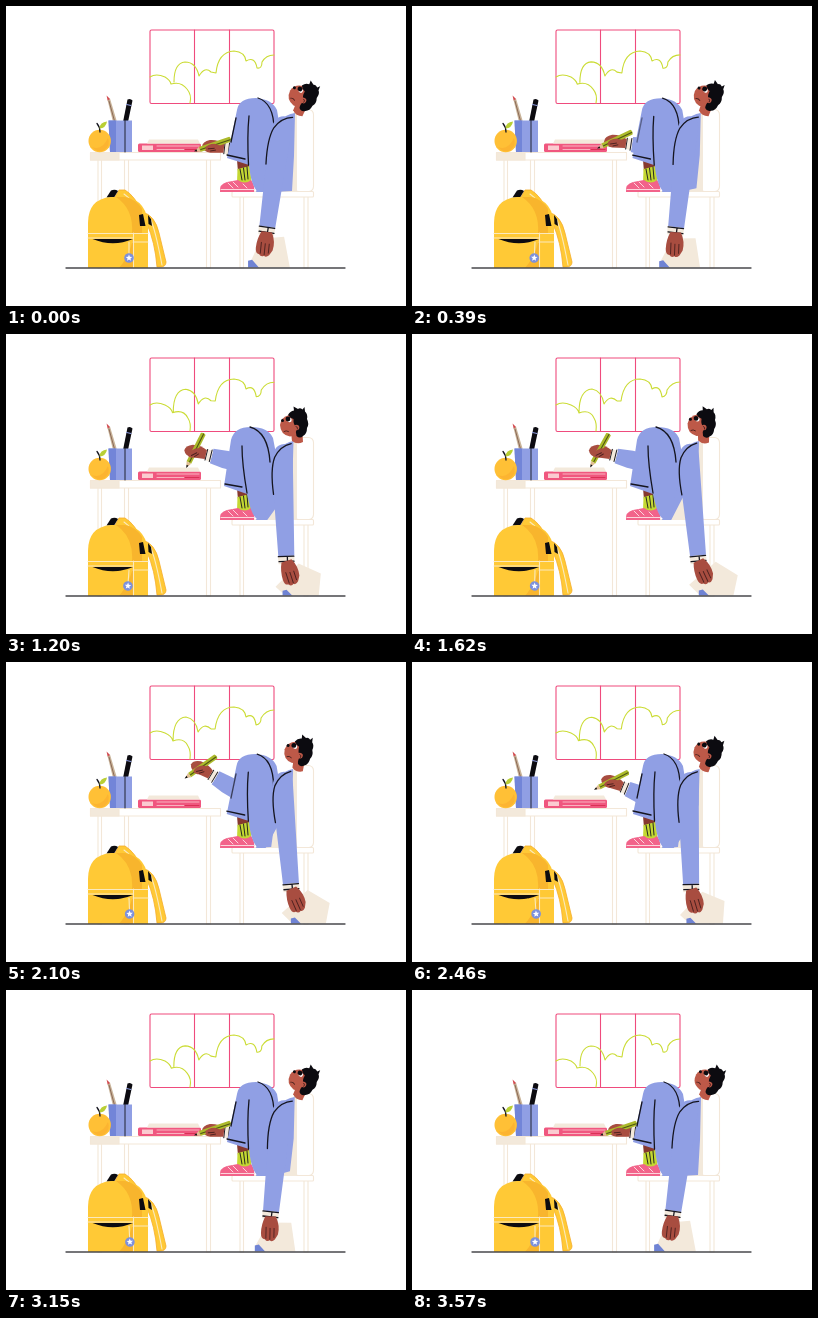
An HTML page that plays this animation: 400x300 px, repeating every 3.6 s.

```html
<!DOCTYPE html>
<html lang="en">
<head>
<meta charset="utf-8">
<title>Daydreaming at the desk</title>
<style>
html, body { margin: 0; width: 100%; height: 100%; overflow: hidden; background: #fff; }
svg { display: block; width: 100vw; height: 100vh; }
path, rect, circle, polygon { stroke-linejoin: round; stroke-linecap: round; }
.ink { fill: none; stroke: #15151f; stroke-width: 1.3; }
.thin { fill: none; stroke: #15151f; stroke-width: .9; }
.cream { fill: #f3e9db; }
.frame { fill: #fff; stroke: #f3e7d8; stroke-width: 1.1; }
.pale { fill: none; stroke: #fbe9bd; stroke-width: 1.1; }
.blue { fill: #909fe4; }
.skin { fill: #bd5948; }
.palm { fill: #a84d40; }
.crease { fill: none; stroke: #4c211f; stroke-width: .9; }
.black { fill: #0c0b10; }
.yellow { fill: #ffc936; }
</style>
</head>
<body>
<svg viewBox="0 0 400 300">
  <defs><clipPath id="above"><rect width="400" height="261.6"/></clipPath></defs>

  <g fill="none" stroke="#ef4b7d" stroke-width="1.1">
    <rect x="144" y="24" width="124" height="73.5" rx="1.5"/>
    <path d="M188.5 24V97.5M223.5 24V97.5"/>
  </g>
  <path id="clouds" fill="none" stroke="#cbdc35" stroke-width="1.1"/>

  <g class="frame">
    <path d="M92 154V262H95.5V154M118.5 154V262H122.5V154M200.5 154V262H204.5V154"/>
    <rect x="84.5" y="146.5" width="130" height="7.5"/>
    <path class="cream" d="M84.5 146.5H113V154H84.5Z"/>
    <path d="M234 191V262H237.5V191M298 191V262H302V191"/>
    <rect x="226" y="185.5" width="81.5" height="5.5" rx="1"/>
    <rect x="288" y="103.5" width="19.5" height="82" rx="5"/>
  </g>
  <path class="cream" d="M287 108H291V185H287Z"/>

  <g id="cup">
    <g id="pens">
      <path d="M101.5 94L104 92.5L111 116H107Z" fill="#c9b49a"/>
      <path d="M100.6 89.5L104 93L101.6 94.5Z" fill="#d2474c"/>
      <path d="M103 95L108.5 115" stroke="#7b5645" stroke-width=".8"/>
      <path class="black" d="M121.5 93.5Q124.5 92 126.5 94.5L122 116H117Z"/>
      <path d="M120.5 98.5L125 99.5" stroke="#909fe4"/>
    </g>
    <path class="blue" d="M102.5 114.5H126V146H104Z"/>
    <path d="M102.5 114.5H110V146H104Z" fill="#7285d8"/>
    <path class="thin" d="M119 114.5V146"/>
  </g>

  <g id="fruit">
    <circle cx="93.7" cy="135" r="11.2" fill="#ffc036"/>
    <path d="M86 141Q96 145 102 132Q105 139 98 144.5Q91 147 86 141Z" fill="#fcb431"/>
    <path class="ink" d="M94 126Q94 121 91 117.5"/>
    <path d="M93.5 122.5Q94 116 101 115.5Q100 122 93.5 122.5Z" fill="#b9cf35"/>
  </g>

  <g id="book">
    <rect x="132" y="137.5" width="63" height="8.5" rx="1.5" fill="#f0577f"/>
    <rect x="136" y="139.5" width="11" height="4.5" fill="#fbcbd0"/>
    <path d="M151 140H193M151 143.5H178" stroke="#fbcbd0" stroke-width=".8"/>
    <path d="M179 143.5H193" stroke="#d93255"/>
  </g>
  <path id="sheet" class="cream" d="M143 133.5H192L194 137.5H141Z"/>

  <g id="bag">
    <path class="yellow" d="M109 191L113 184H119Q129 190 136 206Q149 209 153 227L160 256Q160 261 154 261H151Q149 236 141 218Z" stroke="#f5ad2a" stroke-width=".8"/>
    <path class="pale" d="M118 188Q128 195 134 208M144 212Q149 222 156 259"/>
    <path class="black" d="M100.5 191.5L105 184.5Q109 183 112 185L108 191.5Z"/>
    <path class="yellow" d="M82 262V217Q82 193 105 191H119Q142 194 142 222V262Z"/>
    <path d="M110 191H119Q130 193 136 203V228H126Q128 203 110 191ZM127 234V262H113Q122 252 127 234Z" fill="#f8b52d"/>
    <path class="pale" d="M82 227.5H142M127.5 227V262M82 232H127M127 236H142"/>
    <path class="black" d="M86.5 233H127Q107 241.5 86.5 233ZM133 209L137 208L139.5 220H134ZM142 209L145 213L146 220L142.5 218Z"/>
    <g id="charm">
      <path class="pale" d="M123 236V248"/>
      <circle cx="123" cy="252" r="4.8" fill="#7d91dc"/>
      <polygon id="star" fill="#fff"/>
    </g>
  </g>

  <g id="forearm">
    <path class="blue" d="M17 -7.5L32 -9H62V9H30L17 7.5Z"/>
    <path class="cream" d="M10 -5.5H17V5.5H10Z"/>
    <path class="thin" d="M11.5 -5.5V5.5M16 -6V6"/>
    <path class="palm" d="M11 -4.5Q4 -8 -4 -6.5Q-11 -4 -11 1Q-9 6 -2 6L11 4.5Z"/>
  </g>
  <g id="pencil">
    <path d="M-14 -2.6H18Q20 0 18 2.6H-14Z" fill="#acba2b"/>
    <path d="M-13 .4H18" stroke="#4d5514" stroke-width="1.1"/>
    <path d="M-14 -2.6L-19.5 0L-14 2.6Z" fill="#e0bd92"/>
    <path class="black" d="M-17 -1.1L-20 0L-17 1.1Z"/>
  </g>
  <g id="fingers">
    <path class="palm" d="M-8 0Q-5 -4 2 -3L8 0Q5 5 -1 5Q-7 4 -8 0Z"/>
    <path class="crease" d="M-5 1L1 1.5M-3 3.5L2 3.5"/>
  </g>

  <path class="cream" d="M264 125L290 106V186H255Z"/>
  <path id="torso" class="blue"/>

  <g id="head">
    <path class="skin" d="M285 98L296 93L297 108Q291 111 286 107Z"/>
    <path class="skin" d="M283 81Q275 83 274 91Q274.5 101 284 102.5Q292 102 295 95L294 80Z"/>
    <path class="black" d="M282 81Q284 77 288 76.5L287.5 72.5L292 75Q294 73.5 296.5 75.5L298.5 73L299 77.5Q302 80 301 85Q303.5 90 301 94Q301 100 297 102Q294 105 290.5 102Q289 98 291 94Q287 91 287.5 85Q284 84 282 81Z"/>
    <circle class="skin" cx="290.5" cy="93.5" r="2.8"/>
    <circle cx="283.5" cy="86" r="2.2" fill="#fff"/>
    <circle class="black" cx="282" cy="85" r="2.4"/>
    <circle class="black" cx="276.5" cy="86.5" r="1.5"/>
    <path class="crease" d="M278 97.5Q280 96 282.5 97.5M290 92.5Q292 92.5 291.5 95"/>
  </g>

  <path d="M231 154H243V166H232Z" fill="#86382f"/>
  <path d="M231.5 163L244 160L245.5 177H231Z" fill="#c4d832"/>
  <path class="thin" d="M234 163L236 174M237.5 162L239 174M241 161L242 173"/>
  <path d="M214 186Q213 178 221 176L232 174Q239 179 245 174Q249 179 248 186Z" fill="#f2638a"/>
  <path d="M215 183.5H248M222 177L227 182M227 176L232 181M237 178L241 182" fill="none" stroke="#fcd5dc" stroke-width="1"/>
  <path id="leg" class="blue"/>
  <path id="folds" class="ink"/>
  <path id="edge" class="ink" d="M230 112L225 136"/>

  <g clip-path="url(#above)">
    <polygon id="folder" class="cream"/>
    <polygon id="cover" fill="#6f83d4"/>
  </g>
  <g id="arm">
    <path class="blue" d="M-11.5 12Q-10 -8 2 -8Q11 -7 10 9L8 104H-8Z"/>
    <path class="ink" d="M-10.5 42Q-13 17 -8 5Q-2 -6 9 -8"/>
    <path class="cream" d="M-8.5 104H8V112H-8Z"/>
    <path class="ink" d="M-8 104.5H7.5M-7.5 109.5H7.5M1 105V109"/>
  </g>
  <g id="hand">
    <path class="palm" d="M-5 -1H5.5Q10 8 8 17L5 22Q2 25 0 23Q-3 25 -5 22Q-9 22 -9 16Q-9 7 -5 -1Z"/>
    <path class="crease" d="M-4 10V21M0 11V22M4 11V20"/>
  </g>

  <path d="M60 262H339" stroke="#48484c" stroke-width="1.3"/>
</svg>
<script>
const LOOP = 3600, STEP = 30;
const $ = id => document.getElementById(id);
const set = (id, name, value) => $(id).setAttribute(name, value);
const place = (id, x, y, turn = 0) =>
  set(id, 'transform', `translate(${x} ${y}) rotate(${turn})`);
const mix = (a, b, k) => a + (b - a) * k;

// Each row: time, then the values reached at that time
const headPath = [[0, 28], [250, 28], [720, 14], [1120, 0], [1300, 0], [1620, 5], [2100, 14], [2640, 28], [LOOP, 28]];
const kneePath = [[0, 0], [250, 0], [720, .85], [1120, 1], [1650, 1], [2100, .1], [2500, 0], [LOOP, 0]];
// hand x, hand y, pencil angle, elbow x, elbow y
const rest = [207, 141, -18.4, 250, 146];
const handPath = [
  [0, ...rest], [250, ...rest],
  [720, 189, 117, -51, 250, 133],
  [1000, 188, 118, -64, 250, 133],
  [1660, 188, 118, -61, 250, 133],
  [2100, 195, 107, -35, 240, 134],
  [2300, 195, 107, -33, 240, 134],
  [2670, ...rest], [LOOP, ...rest]
];

function track(rows, t) {
  const i = rows.findIndex(row => row[0] > t);
  const a = rows[i - 1], b = rows[i];
  const u = (t - a[0]) / (b[0] - a[0]);
  return a.slice(1).map((v, n) => mix(v, b[n + 1], u * u * (3 - 2 * u)));
}

// Blend two shapes written with the same commands
function morph(a, b, k) {
  const goal = b.match(/-?[\d.]+/g);
  let n = 0;
  return a.replace(/-?[\d.]+/g, v => mix(+v, +goal[n++], k).toFixed(2));
}

const bounce = (t, from, span) =>
  t > from && t < from + span ? Math.sin(Math.PI * (t - from) / span) : 0;

set('star', 'points', Array.from({ length: 10 }, (_, i) => {
  const a = Math.PI * (i / 5 - .5), r = i % 2 ? 1.5 : 3.4;
  return `${123 + r * Math.cos(a)},${252 + r * Math.sin(a)}`;
}).join(' '));

function draw(t) {
  const phase = 2 * Math.PI * t / LOOP;
  const sway = Math.cos(phase), side = Math.sin(phase);
  const swing = (1 - sway) / 2;

  set('clouds', 'd', morph(
    'M144 71Q150 67 159 71Q164 74 165 78Q175 75 181 83Q186 89 184 97M168 76Q168 57 179 56Q190 56 193 70Q199 60 205 66L210 67Q212 46 228 45Q239 46 240 55Q249 50 251 62Q256 63 256 56Q260 49 268 49',
    'M144 71Q150 67 159 71Q166 74 167 79Q178 75 182 84Q185 89 184 97M167 79Q167 56 180 55Q190 57 192 70Q198 60 205 67L209 67Q212 45 228 45Q239 46 240 55Q248 50 250 63Q255 62 255 56Q260 48 268 48',
    swing));

  const hop = bounce(t, 2670, 300) + .25 * bounce(t, 2970, 180);
  place('sheet', 0, -4 * hop);
  place('book', 0, -.8 * hop);
  place('cup', 0, -1.2 * hop);
  place('pens', -1.2 * hop, -.6 * hop);
  place('fruit', 0, -2.2 * hop);
  set('charm', 'transform', `rotate(${4.5 * side} 123 236)`);

  const [turn] = track(headPath, t);
  set('head', 'transform', `translate(${turn / 14} 0) rotate(${turn} 291 104)`);
  set('torso', 'd', morph(
    'M266 134Q270 110 289 107L288 150L286 185L268 186H250Z',
    'M266 134Q270 110 287 107L286 140L272 160L259 186H250Z', swing));

  const [knee] = track(kneePath, t);
  set('leg', 'd', morph(
    'M221 152L231 104Q233 92 250 92Q266 93 271 104L274 122L266 185L252 186Q245 180 243 159Z',
    'M218 152L225 106Q228 93 245 93Q262 93 267 104L271 125L258 186L250 184Q245 180 241 160Z', knee));
  set('folds', 'd', morph(
    'M252 92Q268 97 268 124M243 110Q241 130 242.5 159M221 149L239 153',
    'M244 93Q262 98 264 128M236 112Q236 130 241 159M219 150L236 153', knee));
  set('edge', 'opacity', Math.max(0, 1 - 3 * knee));

  let [x, y, tilt, ex, ey] = track(handPath, t);
  const writing = bounce(t, 850, 800);
  x += 1.2 * writing * Math.sin(t / 45);
  y += .5 * writing * Math.cos(t / 45);
  place('forearm', x, y, Math.atan2(ey - y, ex - x) * 180 / Math.PI);
  place('pencil', x, y - 2, tilt);
  place('fingers', x, y, tilt / 2);

  const angle = 1.4 + 7 * sway, rad = angle * Math.PI / 180;
  const wx = 276.5 - 110 * Math.sin(rad), wy = 118 + 110 * Math.cos(rad);
  const bend = -10 + 16 * sway;
  place('arm', 276.5, 118, angle);
  place('hand', wx, wy, bend);
  const px = wx - 13 * Math.sin(bend * Math.PI / 180), py = wy + 12;
  place('folder', px, py);
  place('cover', px, py);
  set('folder', 'points', morph('-4,-6 19,-8 25,24 -6,24 -15,18', '12,-12 34,2 29,24 -2,24 -15,11', swing));
  set('cover', 'points', morph('-17,16 -13,15 -5,24 -17,24', '-5,17 -1,16 7,24 -5,24', swing));
}

function tick() {
  draw(Math.floor(performance.now() % LOOP / STEP) * STEP);
  requestAnimationFrame(tick);
}
tick();
</script>
</body>
</html>
```
